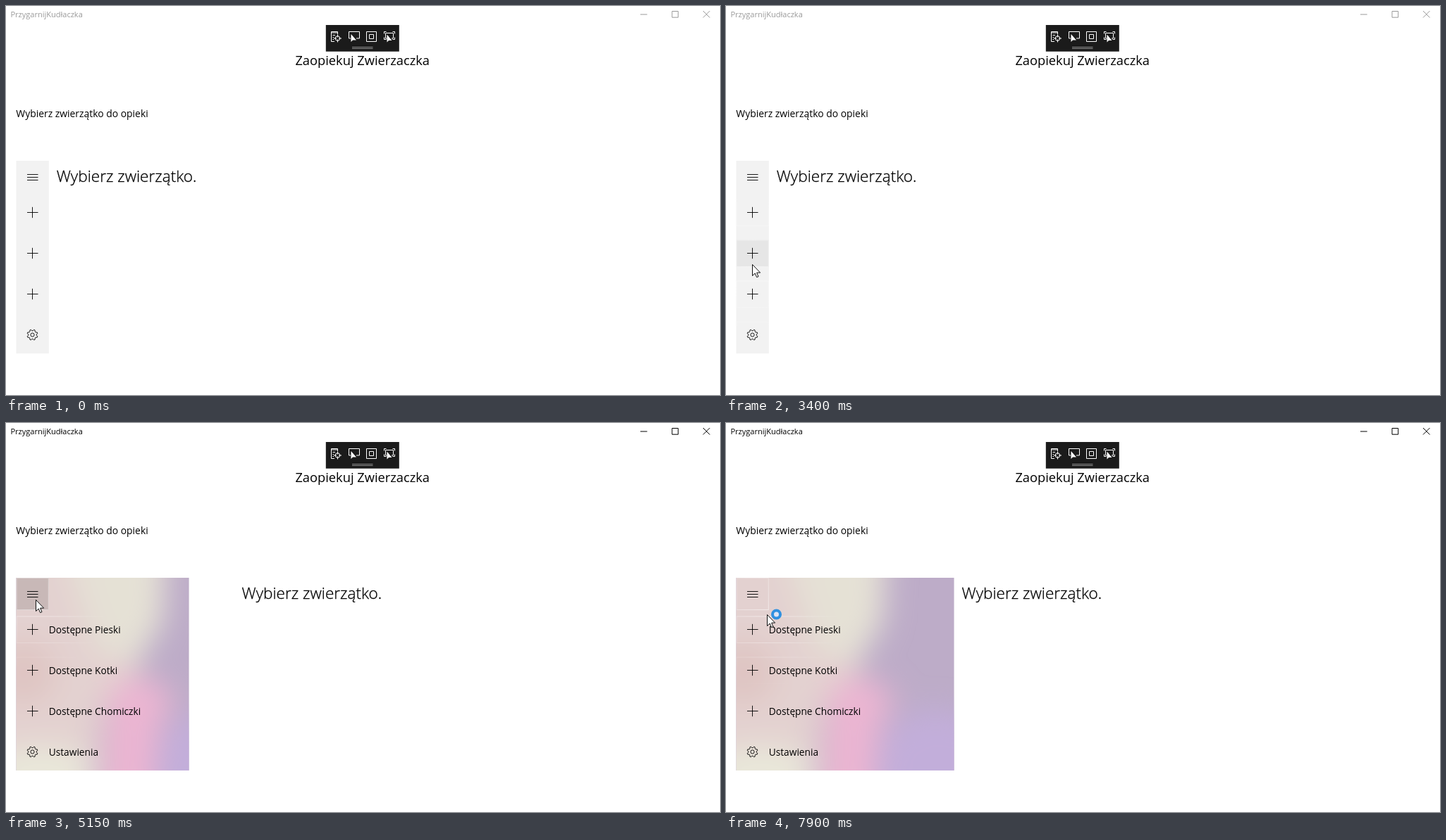
Write an HTML page that moves like this. It is 1013x553 px and loops after 8 s.

```html
<!DOCTYPE html>
<html lang="pl">
<head>
<meta charset="utf-8">
<title>PrzygarnijKudłaczka</title>
<style>
  html, body { margin: 0; width: 100%; height: 100%; overflow: hidden; background: #fff; }
  svg { display: block; }
  text { font-family: "Open Sans", "Noto Sans", sans-serif; }
  .line { fill: none; stroke: #000; stroke-width: .9; }
  .tool { fill: none; stroke: #fff; stroke-width: 1; }
</style>
</head>
<body>
<svg width="1013" height="553" viewBox="0 0 1013 553">
  <defs>
    <clipPath id="paneClip"><rect id="paneArea" x="14.5" y="220" width="46.3" height="274"/></clipPath>
    <filter id="soft" x="-50%" y="-50%" width="200%" height="200%"><feGaussianBlur stdDeviation="21"/></filter>
    <radialGradient id="light" gradientUnits="userSpaceOnUse" r="105">
      <stop offset="0" stop-color="#fff" stop-opacity=".55"/>
      <stop offset="1" stop-color="#fff" stop-opacity="0"/>
    </radialGradient>
    <path id="arrow" d="M.5 .5V16.5L4.2 13 6.6 18.6 9 17.6 6.6 12.1H11.6Z"/>
  </defs>
  <rect width="1013" height="553" fill="#fff"/>

  <g id="titleBar">
    <text id="caption" x="6.5" y="15.7" font-size="11">PrzygarnijKudłaczka</text>
    <path id="windowButtons" fill="none" d="M900 12H909.700M945 7.500H953.700V16.200H945ZM989 7L998.500 16.500M998.500 7L989 16.500"/>
  </g>

  <rect x="453.800" y="27" width="104" height="37.700" fill="#1b1b1b"/>
  <g class="tool">
    <path d="M466 50.500H461.500V36.500H470.500V40M461 38H471M463.500 41.500H467M463.500 44.500H465M463.500 47.500H465"/>
    <circle cx="470.500" cy="46" r="3.300"/>
    <path d="M470.500 40.500V44.500M470.500 47.500V51.500M465 46H469M472 46H476"/>
    <path d="M489 46H486.500V36.500H501.500V46H497"/>
    <path d="M511.500 36.500H525.500V50.500H511.500ZM515.500 40.500H521.500V46.500H515.500Z"/>
    <path d="M536.500 39.500V36.500H539.500M548.500 36.500H551.500V39.500M551.500 44.500V47.500H548.500M539.500 47.500H536.500V44.500M540.500 46H538.500V38.500H549.500V46H547"/>
    <path d="M489.500 40V51L492 48.500H497ZM540.500 40.500V51.500L543 49H547.500Z" fill="#fff" stroke="none"/>
    <path d="M491 58.500H520.500M491 60.500H520.500" stroke="#8b8b8b"/>
  </g>

  <text x="410.400" y="84" font-size="18.300">Zaopiekuj Zwierzaczka</text>
  <text x="14.300" y="158.300" font-size="13.900">Wybierz zwierzątko do opieki</text>
  <text id="prompt" y="250" font-size="22.600" font-weight="300" stroke="#000" stroke-width=".3">Wybierz zwierzątko.</text>

  <g clip-path="url(#paneClip)">
    <rect x="14" y="220" width="310" height="274" fill="#f2f2f2"/>
    <g id="acrylic">
      <rect x="14" y="220" width="310" height="274" fill="#bdacc8"/>
      <g filter="url(#soft)">
        <path d="M-40 170H215L190 350 140 400 120 550H-40Z" fill="#e3d1d0"/>
        <path d="M80 170H228L222 285 185 340 130 325Z" fill="#e5e1d5"/>
        <ellipse cx="25" cy="355" rx="45" ry="45" fill="#dfc5c2"/>
        <path d="M150 370L195 360 240 385 215 440 205 550H135Z" fill="#ecb5d2"/>
        <path d="M222 440L280 405 370 420V560H205Z" fill="#c2aeda"/>
        <ellipse cx="50" cy="496" rx="78" ry="36" fill="#e9e8da"/>
      </g>
    </g>
    <rect id="hover"/>
    <g id="borders" fill="none" stroke="url(#light)"></g>
    <path class="line" d="M30 239.500H45.500M30 243.500H45.500M30 247.500H45.500"/>
    <g id="items"></g>
  </g>

  <g id="cursor">
    <use href="#arrow" fill="#fff" stroke="#111" stroke-width="1"/>
    <circle id="busy" cx="13.500" cy="0" r="5.500" fill="#dfe3f3" stroke="#2f90e0" stroke-width="4"/>
  </g>
</svg>
<script>
const LOOP = 8000, FOCUS = 5030, OPENING = 5150, OPENED = 5260, BUSY = 7790;
const PANE_X = 14.5, COMPACT = 46.3, FULL = 309;
const el = id => document.getElementById(id);

function add(parent, tag, attrs, content = '') {
  const node = document.createElementNS('http://www.w3.org/2000/svg', tag);
  set(node, attrs);
  node.textContent = content;
  parent.append(node);
  return node;
}

function set(node, attrs) {
  for (const name in attrs) node.setAttribute(name, attrs[name]);
}

// Cells that react to the pointer: the menu button, then four rows.
const labels = ['Dostępne Pieski', 'Dostępne Kotki', 'Dostępne Chomiczki', 'Ustawienia'];
const cells = [{ y: 220, h: 46, button: true }];
labels.forEach((label, i) => {
  const mid = 293.5 + i * 58;
  cells.push({ y: mid - 19, h: 38.5 });
  add(el('items'), 'text', { x: 60.8, y: mid + 5.4, 'font-size': 13.7 }, label);
  add(el('items'), 'path', {
    class: 'line',
    d: i < 3 ? `M30 ${mid}H45.500M37.500 ${mid - 7.7}V${mid + 7.7}` : gear(37.5, mid)
  });
});
for (const cell of cells) {
  cell.border = add(el('borders'), 'rect', { x: PANE_X + .5, y: cell.y + .5, height: cell.h - 1 });
}

function gear(cx, cy) {
  const points = [];
  for (let i = 0; i < 32; i++) {
    const angle = (i + 1.5) * Math.PI / 16;
    const r = i % 4 < 2 ? 7.6 : 5.8;
    points.push(`${cx + r * Math.cos(angle)} ${cy + r * Math.sin(angle)}`);
  }
  return `M${points.join('L')}ZM${cx + 2.6} ${cy}a2.600 2.600 0 1 0 -5.200 0a2.600 2.600 0 1 0 5.200 0`;
}

// Pointer strokes: start, end, number of steps, then [step, x, y] points.
const strokes = [
  [530, 1290, 8, [[0, 782, 483], [4, 330, 372], [5, 240, 346], [6, 180, 355], [7, 184, 374]]],
  [1530, 2050, 6, [[3, 58, 240], [5, 27, 235]]],
  [2270, 2710, 5, [[4, 37, 286]]],
  [2960, 3700, 8, [[4, 37, 367], [7, 41, 406]]],
  [3830, 3940, 2, [[1, 38, 464]]],
  [4160, 4810, 7, [[3, 35, 350], [6, 42, 251]]],
  [5820, 6580, 8, [[4, 36, 340], [7, 52, 384]]],
  [6690, 7000, 4, [[3, 84, 462]]],
  [7140, 7900, 8, [[2, 81, 432], [7, 58, 272]]]
];

function pointerAt(t) {
  let at = null;
  for (const [start, end, count, points] of strokes) {
    if (t < start) break;
    const step = Math.min(count - 1, Math.floor((t - start) / (end - start) * (count - 1) + .1));
    let from = at ? [-1, at.x, at.y] : points[0];
    for (const to of points) {
      const u = to[0] === from[0] ? 1 : Math.min(1, (step - from[0]) / (to[0] - from[0]));
      at = { x: from[1] + (to[1] - from[1]) * u, y: from[2] + (to[2] - from[2]) * u };
      if (step <= to[0]) break;
      from = to;
    }
  }
  return at;
}

function draw(t) {
  const open = t >= OPENING;
  const width = t >= OPENED ? FULL : open ? 245 : COMPACT;
  const ink = t >= FOCUS ? '#000' : '#999';
  set(el('caption'), { fill: ink });
  set(el('windowButtons'), { stroke: ink });
  set(el('paneArea'), { width });
  set(el('acrylic'), { visibility: open ? 'visible' : 'hidden' });
  set(el('prompt'), { x: open ? 334.5 : 71.7 });

  const p = pointerAt(t);
  const inPane = p && p.x < PANE_X + width && p.y >= 220 && p.y < 494;
  const cell = inPane && cells.find(c =>
    p.y >= c.y && p.y < c.y + c.h && (!c.button || p.x < PANE_X + COMPACT));
  set(el('hover'), cell ? {
    x: PANE_X, y: cell.y, height: cell.h, width: cell.button ? COMPACT : width,
    'fill-opacity': cell.button ? (t < 4160 ? .1 : .12) : open ? .085 : .05
  } : { width: 0 });

  set(el('borders'), { visibility: inPane ? 'visible' : 'hidden' });
  for (const c of cells) set(c.border, { width: (c.button ? COMPACT : width) - 1 });

  set(el('cursor'), { visibility: p ? 'visible' : 'hidden' });
  if (p) {
    set(el('light'), { cx: p.x, cy: p.y });
    set(el('cursor'), { transform: `translate(${p.x} ${p.y})` });
  }
  set(el('busy'), { display: t >= BUSY ? 'inline' : 'none' });
}

function tick() {
  draw(performance.now() % LOOP);
  requestAnimationFrame(tick);
}
tick();
</script>
</body>
</html>
```
